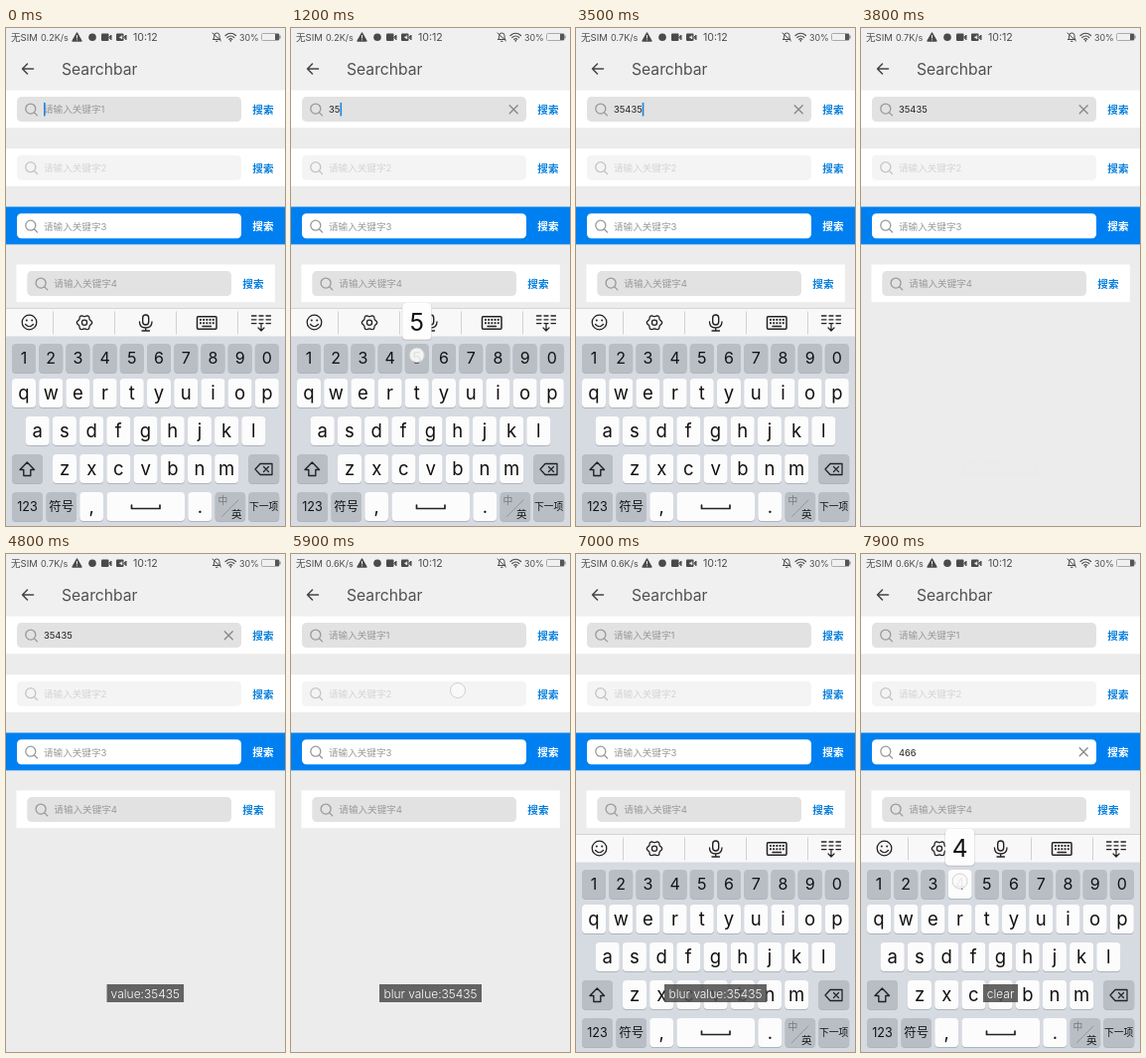
An HTML page that plays this animation: 281 px wide and 500 px high, repeating every 8000 ms.

```html
<!DOCTYPE html>
<html lang="zh">
<head>
<meta charset="utf-8">
<style>
  html, body { margin: 0; width: 100%; height: 100%; overflow: hidden; background: #ececec; }
  svg { display: block; width: 100vw; height: 100vh; }
  text { font-family: Inter, "Noto Sans CJK SC", "Noto Sans CJK", sans-serif; white-space: pre; }
</style>
</head>
<body>
<svg viewBox="0 0 281 500">
  <g id="page"></g>
  <g id="board"></g>
  <g id="over"></g>
</svg>
<script>
const LOOP = 8000, BLUE = '#0080f0';
const [page, board, over] = ['page', 'board', 'over'].map(id => document.getElementById(id));

const rect = (x, y, w, h, fill, r = 0, more = '') =>
  `<rect x="${x}" y="${y}" width="${w}" height="${h}" rx="${r}" fill="${fill}" ${more}/>`;
const text = (x, y, size, fill, s, more = '') =>
  `<text x="${x}" y="${y}" font-size="${size}" fill="${fill}" ${more}>${s}</text>`;
const line = (d, color, w = 1, fill = 'none') =>
  `<path d="${d}" stroke="${color}" stroke-width="${w}" fill="${fill}" stroke-linecap="round" stroke-linejoin="round"/>`;
const disc = (x, y, r, fill, more = '') => `<circle cx="${x}" cy="${y}" r="${r}" fill="${fill}" ${more}/>`;
const MID = 'text-anchor="middle"';

// Typed digits: [time, digit, touch offset]
const first = [[700, 3, 2], [1200, 5, 0], [1700, 4, 1], [2150, 3, 8], [2700, 5, 1]];
const second = [[7350, 4, 0], [7550, 6, 1], [7750, 6, 1], [8000, 4, 0]];
const presses = [...first, ...second];
const keyX = digit => 18 + 27.2 * (digit - 1);

// Touches: [start, end, x, y]
const touches = [
  ...presses.map(([t, d, dx]) => [t - 150, t + 150, keyX(d) + dx, 328.5]),
  [3150, 3450, 259, 82], [4850, 5250, 224, 82], [5650, 6100, 168, 137], [6350, 6700, 150, 198]
];
const toasts = [
  [3800, 5250, 'value:35435', 140.3, 77.5],
  [5600, 7350, 'blur value:35435', 140.5, 103],
  [7500, 8400, 'clear', 140.5, 35]
];

const typed = (list, t) => list.filter(p => p[0] <= t).map(p => p[1]).join('');
const clamp = v => Math.max(0, Math.min(1, v));

function statusBar(t) {
  const ink = '#4a4a4a';
  const speed = t < 2900 ? '0.2' : t < 5600 ? '0.7' : '0.6';
  const camera = x => rect(x, 5.5, 7.5, 7.5, ink, 1) + line(`M${x + 8} 9L${x + 10} 7V11.5Z`, ink, 1, ink);
  return text(5, 13, 9.6, ink, '无SIM') + text(35, 13, 9.1, ink, speed + 'K/s') +
    line('M71.5 5L76 13H67Z', ink, 1.4, ink) + line('M71.5 7.5V10M71.5 11.8V12', '#eee', 1) +
    disc(87, 9.3, 3.8, ink) + camera(96) + camera(111) +
    line('M117 8V11L114.5 9.5Z', '#eee', .5, '#eee') +
    text(128, 13, 10.6, ink, '10:12') +
    line('M208.5 11.5H216L215 10V7.5Q215 5 212.3 5T209.6 7.5V10ZM211.5 13.3H213M208 5L216.5 13', ink, 1) +
    line('M221 7.5Q226.3 3 231.5 7.5M222.8 9.5Q226.3 6.5 229.7 9.5M224.7 11.4Q226.3 10 227.8 11.4', ink, 1.2) +
    disc(226.3, 12.8, .9, ink) + text(235, 13, 8.8, ink, '30%') +
    rect(257.5, 5.5, 17.5, 7, 'none', 1, 'stroke="#aaa"') + rect(271, 6, 4, 6, '#555') +
    rect(275.3, 7.5, 1.2, 3, '#777');
}

function searchBar({ y, n, x = 0, w = 281, bar = '#fff', fill = '#e2e2e2', hint = '#999', icon = '#999', link = '#0a80dc' }, value, caret) {
  const pad = x ? 21.3 : 11, width = x ? 205.7 : 226, cy = y + 19;
  const end = pad + 27 + value.length * 5.75;
  return rect(x, y, w, 37.8, bar) + rect(pad, y + 6.7, width, 25, fill, 4.5) +
    disc(pad + 13.8, cy - .3, 5, 'none', `stroke="${icon}" stroke-width="1.3"`) +
    line(`M${pad + 17.5} ${cy + 3.5}l3 3`, icon, 1.3) +
    text(pad + 27, cy + 4, value ? 9.4 : 9.6, value ? '#222' : hint, value || '请输入关键字' + n) +
    (value ? line(`M${pad + 209.2} ${cy - 3.7}l8 8m0 -8l-8 8`, '#888', 1.3) : '') +
    (caret ? rect(end, y + 12.5, 1.6, 13.5, caret) : '') +
    text(pad + width + 11.3, cy + 4.8, 10.6, link, '搜索', 'font-weight="700"');
}

function drawPage(t) {
  const one = t < 5150 ? typed(first, t) : '', two = typed(second, t);
  const blink = t % 1000 < 600;
  page.innerHTML = rect(0, 0, 281, 500, '#ececec') + rect(0, 0, 281, 62, '#f0f0f0') + statusBar(t) +
    line('M16.5 41H27.5M21.5 36L16.5 41L21.5 46', '#444', 1.5) +
    text(56, 47.3, 15.7, '#505050', 'Searchbar') +
    searchBar({ y: 62.4, n: 1 }, one, t < 3600 && blink && '#1f83d8') +
    searchBar({ y: 121, n: 2, fill: '#f4f4f4', hint: '#d4d4d4', icon: '#c4c4c4' }, '') +
    searchBar({ y: 179.5, n: 3, bar: BLUE, fill: '#fff', link: '#fff' }, two, t > 7300 && blink && '#555') +
    searchBar({ y: 237.4, n: 4, x: 10.5, w: 260.3 }, '');
}

function key(x, y, w, label, gray, size = 18.5, ink = '#111') {
  const base = y + 14.4 + size * (size > 15 ? .34 : .36);
  return rect(x, y + 1, w, 29, '#b0b4ba', 4) + rect(x, y, w, 29, gray ? '#b9bec5' : '#fcfcfd', 4) +
    text(x + w / 2, base, size, ink, label, MID);
}

// Rounded six-lobed outline
function gear(cx, cy) {
  const points = Array.from({ length: 48 }, (_, i) => {
    const a = i * Math.PI / 24, r = 6.9 + .8 * Math.cos(6 * a);
    return `${cx + r * Math.cos(a)} ${cy + r * Math.sin(a)}`;
  });
  return line(`M${points.join('L')}Z`, '#222', 1.3) + disc(cx, cy, 2.6, 'none', 'stroke="#222" stroke-width="1.3"');
}

function buildBoard() {
  const ink = '#222';
  const row = (s, x, y, gray, size) => [...s].map((c, i) => key(x + 27.2 * i, y, 24, c, gray, size)).join('');
  let s = rect(0, 281, 281, 29, '#f8f8f9') + rect(0, 281, 281, .8, '#ccc') + rect(0, 309.5, 281, 190.5, '#d6dae1');
  for (let x = 47; x < 240; x += 62) s += rect(x, 284.5, .8, 23, '#c8c8c8');
  s += disc(23.5, 295.5, 7.3, 'none', `stroke="${ink}" stroke-width="1.3"`) +
    disc(20.8, 293.5, 1, ink) + disc(26.2, 293.5, 1, ink) + line('M19.5 297.5Q23.5 302 27.5 297.5', ink, 1.2) +
    gear(79, 295.8) +
    rect(137.7, 288, 6, 10, 'none', 3, `stroke="${ink}" stroke-width="1.4"`) +
    line('M134.5 295Q134.5 301 140.7 301T147 295M140.7 301V304M137 304H144.5', ink, 1.3) +
    rect(192.5, 289.8, 19.5, 12.5, 'none', 1, `stroke="${ink}" stroke-width="1.5"`) +
    line('M198 299.4H206.5', ink, 1.5);
  for (let i = 0; i < 10; i++) s += rect(195 + i % 5 * 3.2, i < 5 ? 292 : 295.3, 1.9, 1.9, ink);
  for (let y = 289; y < 298; y += 3.8) s += line(`M247.5 ${y}h4.5m3 0h4m3 0h4.5`, ink, 1.3);
  s += line('M257 297V303.5M254 301L257 304L260 301', ink, 1.2) +
    row('1234567890', 6, 317, true, 16) + row('qwertyuiop', 6, 352) +
    row('asdfghjkl', 19.7, 390) + row('zxcvbnm', 47, 428) +
    key(6, 428, 31, '', true) + key(244.2, 428, 31, '', true) +
    key(6, 466, 31, '123', true, 12.6) + key(40.5, 466, 30.5, '符号', true, 12.4) +
    key(74.3, 466, 23.7, ',') + key(101.5, 466, 78.5, '') + key(183.4, 466, 23.8, '.') +
    key(210.6, 466, 30.5, '', true) + key(244.2, 466, 31, '下一项', true, 9.8) +
    line('M21.3 436L28.5 443.5H24.8V449.5H17.8V443.5H14Z', ink, 1.4) +
    line('M251 443L256 437.5H268V448.5H256ZM259.5 440.5L264.5 445.5M264.5 440.5L259.5 445.5', ink, 1.3) +
    line('M126.5 479V482.5H155V479', ink, 1.7) +
    text(218.3, 478, 9.8, '#777', '中', MID) + line('M217.5 490.5L234 474', '#8a8d92', .8) +
    text(232.3, 491.5, 10.5, '#111', '英', MID);
  board.innerHTML = s;
}

function drawOver(t) {
  let s = '';
  for (const [at, d] of presses) {
    if (t < at - 150 || t >= at + 80) continue;
    const x = keyX(d);
    if (t < at) s += key(x - 12, 317, 24, d, false, 16, '#666');
    s += rect(x - 15, 276.3, 30, 37.5, '#a5a5a5', 4, 'opacity=".5"') + rect(x - 14.6, 276, 29.2, 36.8, '#fdfdfd', 4) +
      text(x, 304.3, 24.5, '#111', d, MID);
  }
  for (const [a, b, label, x, w] of toasts) {
    const alpha = Math.min(clamp((t - a) / 200), clamp((b - t) / 200));
    if (alpha) s += `<g opacity="${alpha}">` + rect(x - w / 2, 432, w, 18, '#505050', 0, 'opacity=".88"') +
      text(x, 445.6, 12, '#fff', label, MID + ' font-weight="300"') + '</g>';
  }
  for (const [a, b, x, y] of touches) {
    if (t < a || t > b) continue;
    s += disc(x, y, 7.5, '#fafafa', `stroke="#ccc" stroke-width="1" opacity="${.9 * clamp((b - t) / 130)}"`);
  }
  over.innerHTML = s;
}

function frame(now) {
  const t = now % LOOP;
  const rise = t < 3600 ? 1 : clamp((t - 6450) / 250);
  drawPage(t);
  board.setAttribute('transform', `translate(0 ${219 * (1 - rise) ** 2})`);
  board.setAttribute('visibility', rise ? 'visible' : 'hidden');
  drawOver(t);
  requestAnimationFrame(frame);
}

buildBoard();
frame(0);
</script>
</body>
</html>
```
